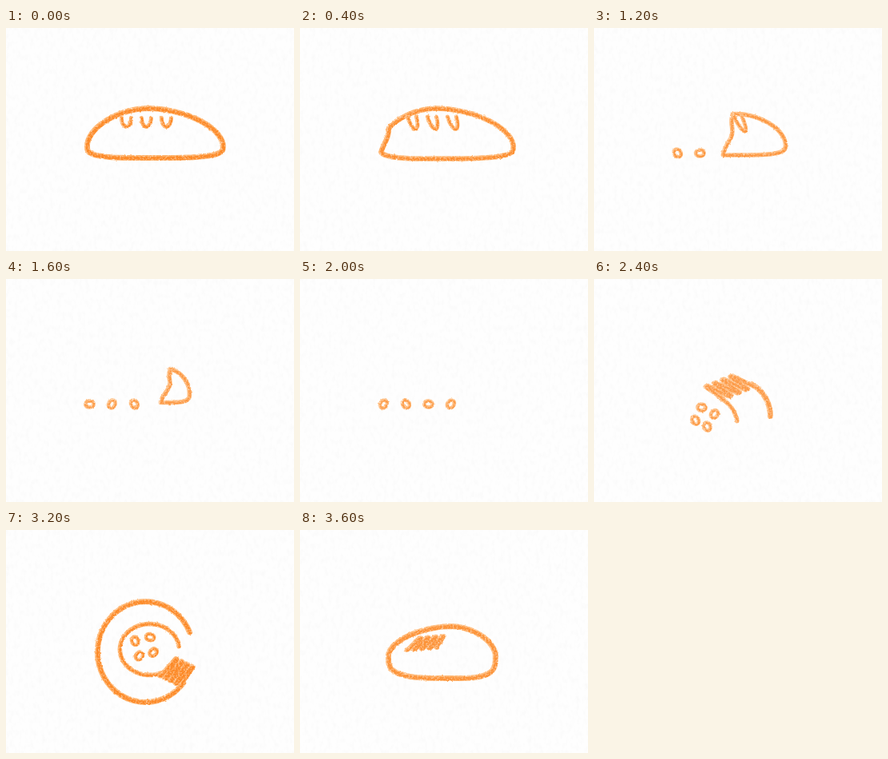
These frames come from a looping animation (360 px wide and 279 px high, 3800 ms). An HTML page:

```html
<!DOCTYPE html>
<html lang="en">
<head>
<meta charset="utf-8">
<title>Bread loop</title>
<style>
  html, body { margin: 0; width: 100%; height: 100%; overflow: hidden; background: #fefefe; }
  svg { display: block; width: 100%; height: 100%; }
  path { fill: none; stroke-linecap: round; stroke-linejoin: round; }
</style>
</head>
<body>
<svg viewBox="0 0 360 279">
  <defs>
    <filter id="crayon" filterUnits="userSpaceOnUse" x="0" y="0" width="360" height="279" color-interpolation-filters="sRGB">
      <feTurbulence class="noise" type="fractalNoise" baseFrequency=".3" numOctaves="2" result="rough"/>
      <feDisplacementMap in="SourceGraphic" in2="rough" scale="2.5" xChannelSelector="R" yChannelSelector="G" result="edge"/>
      <feTurbulence class="noise" type="fractalNoise" baseFrequency=".45" numOctaves="2"/>
      <feColorMatrix values="0 0 0 0 0  0 0 0 0 0  0 0 0 0 0  0 0 0 1.4 .25" result="grain"/>
      <feComposite in="edge" in2="grain" operator="in"/>
    </filter>
    <filter id="paper" filterUnits="userSpaceOnUse" x="0" y="0" width="360" height="279" color-interpolation-filters="sRGB">
      <feTurbulence class="noise" type="fractalNoise" baseFrequency=".2 .12" numOctaves="2"/>
      <feColorMatrix values="0 0 0 0 .4  0 0 0 0 .4  0 0 0 0 .4  0 0 0 .06 -.027"/>
    </filter>
  </defs>
  <rect width="360" height="279" fill="#fefefe"/>
  <rect width="360" height="279" filter="url(#paper)"/>
  <g filter="url(#crayon)"><g id="ink"></g></g>
</svg>
<script>
const STEP = 200, STEPS = 19;
const ink = document.getElementById('ink');
const noises = document.querySelectorAll('.noise');

const rad = deg => deg * Math.PI / 180;
const mix = (a, b, k) => Array.isArray(a) ? a.map((v, i) => mix(v, b[i], k)) : a + (b - a) * k;
const add = (p, q, k = 1) => [p[0] + q[0] * k, p[1] + q[1] * k];
const sample = (n, f) => Array.from({ length: n + 1 }, (_, i) => f(i / n));

// Value of a keyed track at a step, or null outside its span.
function at(track, n) {
  const keys = Object.keys(track).map(Number);
  const i = keys.findIndex(k => k >= n);
  if (i < 0 || n < keys[0]) return null;
  if (keys[i] === n) return track[n];
  const a = keys[i - 1], b = keys[i];
  return mix(track[a], track[b], (n - a) / (b - a));
}

// A solid core over a paler fringe towards the upper left.
function stroke(points, w) {
  const d = 'M' + points.map(p => p.map(v => v.toFixed(1))).join('L');
  return `<path d="${d}" transform="translate(-.6 -.5)" stroke="#ffb26a" stroke-width="${w + 1}"/>` +
         `<path d="${d}" stroke="#fc8a28" stroke-width="${w - 1.6}"/>`;
}

// left, right, top, base, peak x, widest y, bite x
const eaten = {
  0: [102, 272, 101, 163, 178, 148, 80],
  1: [99, 276, 100, 164, 178, 148, 85],
  4: [102, 250, 103, 164, 155, 150, 130],
  8: [150, 230, 113, 155, 203, 143, 194],
  9: [165, 220, 127, 153, 203, 147, 196]
};
const dough = {
  17: [113, 243, 102, 217, 178, 160, 0],
  18: [111, 245, 121, 186, 190, 158, 0]
};

// Domed loaf with a flat base; the bite pushes its left side in.
function loaf([left, right, top, base, peak, mid, bite]) {
  return sample(72, t => {
    const c = Math.cos(t * 2 * Math.PI), s = Math.sin(t * 2 * Math.PI);
    const e = 2 / (s < 0 ? 1.8 : 3.4);
    const x = peak + (c < 0 ? left - peak : right - peak) * Math.abs(c) ** e;
    const y = mid + (s < 0 ? top - mid : base - mid) * Math.abs(s) ** e;
    const k = (y - top) / (base - top);
    return [Math.max(x, bite + 12 * (1 - k) + 5 * Math.sin(Math.PI * k) ** 3), y];
  });
}

// Cuts lengthen and lean as the loaf is eaten.
function cuts(n, bite) {
  const k = Math.min(n / 4, 1);
  const [dx, y, w, h, lean] = mix([0, 113, 6, 11, 0], [-21, 110, 5, 20, 9], k);
  let out = '';
  for (let i = 0; i < 3; i++) {
    const x = 151 + 25 * i + dx;
    if (x < bite + 16) continue;
    out += stroke(sample(12, t => {
      const a = Math.PI * (1 - t), s = Math.sin(a);
      return [x + w * Math.cos(a) + lean * s, y + h * s];
    }), 4);
  }
  return out;
}

// Outer and inner edge of the arm: cx, cy, rx, ry, from, to
const gather = [[175, 172, 46, 46, 0, -60], [140, 185, 40, 40, -10, -65]];
const arm = {
  11: gather.map(([x, y, ...rest]) => [x + 27, y - 8, ...rest]),
  12: gather,
  14: [[180, 144, 64, 48, -12, -180], [190, 160, 34, 33, 6, -180]],
  16: [[175, 153, 60, 63, -23, -322], [180, 150, 37, 32, -7, -295]]
};
const arc = ([cx, cy, rx, ry, from, to]) => sample(40, t => {
  const a = rad(mix(from, to, t));
  return [cx + rx * Math.cos(a), cy + ry * Math.sin(a)];
});

// Four rounded fingers between a and b.
const fingers = (a, b, reach) => sample(64, t => {
  const wave = Math.max(0, Math.min(1, .5 - .7 * Math.cos(8 * Math.PI * t)));
  return add(mix(a, b, t), reach, 1.2 * wave - .2);
});

function hand([outer, inner]) {
  const back = arc(outer), palm = arc(inner);
  const a = rad(outer[5]);
  const reach = [24 * Math.sin(a), -24 * Math.cos(a)];
  return stroke(back, 6) + stroke(palm, 4.6) +
    stroke(fingers(back.at(-1), palm.at(-1), reach), 4.8);
}

// Ring of gathered crumbs: cx, cy, radius, turn
const ring = {
  12: [139, 173, 12.5, 160],
  14: [183, 169, 18, 130],
  16: [173.5, 146, 13.5, 118]
};

function crumb(i, n) {
  if (n < 4 + 2 * i || n > 16) return '';
  const [cx, cy, r, turn] = at(ring, Math.max(n, 12));
  const a = rad(turn + 92 * i);
  const trail = [105 + 28 * i, 157];
  const heap = [cx + r * Math.cos(a), cy + r * Math.sin(a)];
  const [x, y] = mix(trail, heap, Math.max(0, Math.min(1, (n - 10) / 2)));
  return stroke(sample(16, t => {
    const b = t * 2 * Math.PI;
    const size = 4.6 + .6 * Math.sin(2 * b + n + 2 * i);
    return [x + size * Math.cos(b), y + size * Math.sin(b)];
  }), 3.6);
}

const strength = { 0: 1, 4: .9, 12: .85, 14: .88, 16: 1, 18: .92 };

function draw(n) {
  const bread = at(eaten, n), bun = at(dough, n), limb = at(arm, n);
  let out = '';
  if (bread) out += stroke(loaf(bread), Math.max(4.6, 6 - n / 4)) + cuts(n, bread[6]);
  if (bun) {
    const [x, y] = [bun[4] - 54, bun[2] + 27];
    out += stroke(loaf(bun), 6) + stroke(fingers([x, y], [x + 38, y - 3], [10, -12]), 4.6);
  }
  if (limb) out += hand(limb);
  for (let i = 0; i < 4; i++) out += crumb(i, n);

  ink.innerHTML = out;
  ink.setAttribute('opacity', at(strength, n));
  noises.forEach((f, i) => f.setAttribute('seed', n * 3 + i + 1));
}

let shown = -1;
const start = performance.now();
function tick() {
  const n = Math.floor((performance.now() - start) / STEP) % STEPS;
  if (n !== shown) draw(shown = n);
  requestAnimationFrame(tick);
}
tick();
</script>
</body>
</html>
```
